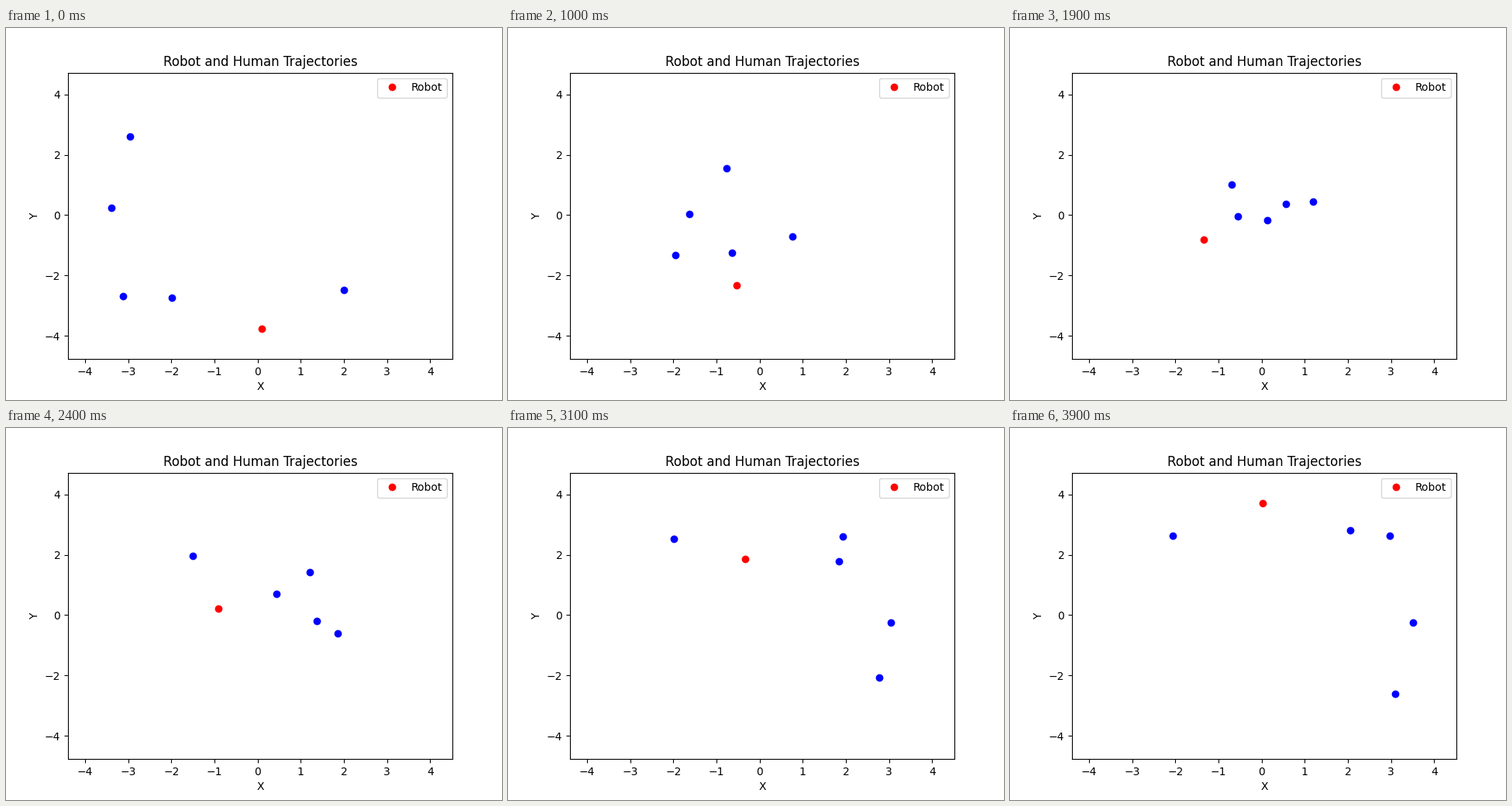
Write a matplotlib script that moves like this. It is 640 px wide and 480 px high and loops after 4000 ms.

```python
import numpy as np
import matplotlib.pyplot as plt
from matplotlib.animation import FuncAnimation

FRAMES = 40
STEP = 0.25  # seconds per simulation step, top speed 1 unit/s

# Each human passes four key points while crossing, then heads for a goal
CROSSING_STEPS = [0, 4, 10, 19]
HUMANS = [
    [(-2.96, 2.61), (-2.10, 2.22), (-0.77, 1.55), (1.19, 0.45), (3.13, -2.66)],
    [(-3.39, 0.24), (-2.72, 0.24), (-1.63, 0.04), (0.13, -0.17), (3.56, -0.25)],
    [(-3.12, -2.69), (-2.76, -2.20), (-1.95, -1.33), (-0.55, -0.04), (3.13, 2.76)],
    [(-1.99, -2.74), (-1.47, -2.22), (-0.64, -1.25), (0.56, 0.37), (2.07, 2.84)],
    [(2.00, -2.48), (1.71, -1.87), (0.76, -0.71), (-0.69, 1.01), (-2.07, 2.63)],
]

ROBOT_STEPS = [0, 4, 6, 10, 12, 19, 24, 31, 39]
ROBOT = [(0.10, -3.77), (0.47, -2.84), (0.15, -2.82), (-0.53, -2.33), (-0.77, -2.28),
         (-1.34, -0.81), (-0.91, 0.22), (-0.34, 1.86), (0.02, 3.71)]


def follow(steps, points):
    """Positions at every step up to the last key point."""
    t = np.arange(steps[-1] + 1)
    return np.column_stack([np.interp(t, steps, axis) for axis in zip(*points)])


def human_path(points):
    """Cross, then walk to the goal, slowing down within one unit of it."""
    *keys, goal = points
    path = list(follow(CROSSING_STEPS, keys))
    while len(path) < FRAMES:
        gap = goal - path[-1]
        path.append(path[-1] + STEP * gap / max(1.0, np.hypot(*gap)))
    return path


human_paths = np.array([human_path(points) for points in HUMANS])
robot_path = follow(ROBOT_STEPS, ROBOT)

fig, ax = plt.subplots(figsize=(6.4, 4.8), dpi=100)
ax.set_xlim(-4.395, 4.514)
ax.set_ylim(-4.773, 4.723)
ax.set_xlabel("X")
ax.set_ylabel("Y")
ax.set_title("Robot and Human Trajectories")

robot_dot, = ax.plot([], [], "ro", label="Robot")
human_dots, = ax.plot([], [], "bo")
ax.legend(loc="upper right")


def update(i):
    robot_dot.set_data(robot_path[i:i + 1].T)
    human_dots.set_data(human_paths[:, i].T)
    return robot_dot, human_dots


anim = FuncAnimation(fig, update, frames=FRAMES, interval=100,
                     repeat=True, repeat_delay=0)
plt.show()
```
